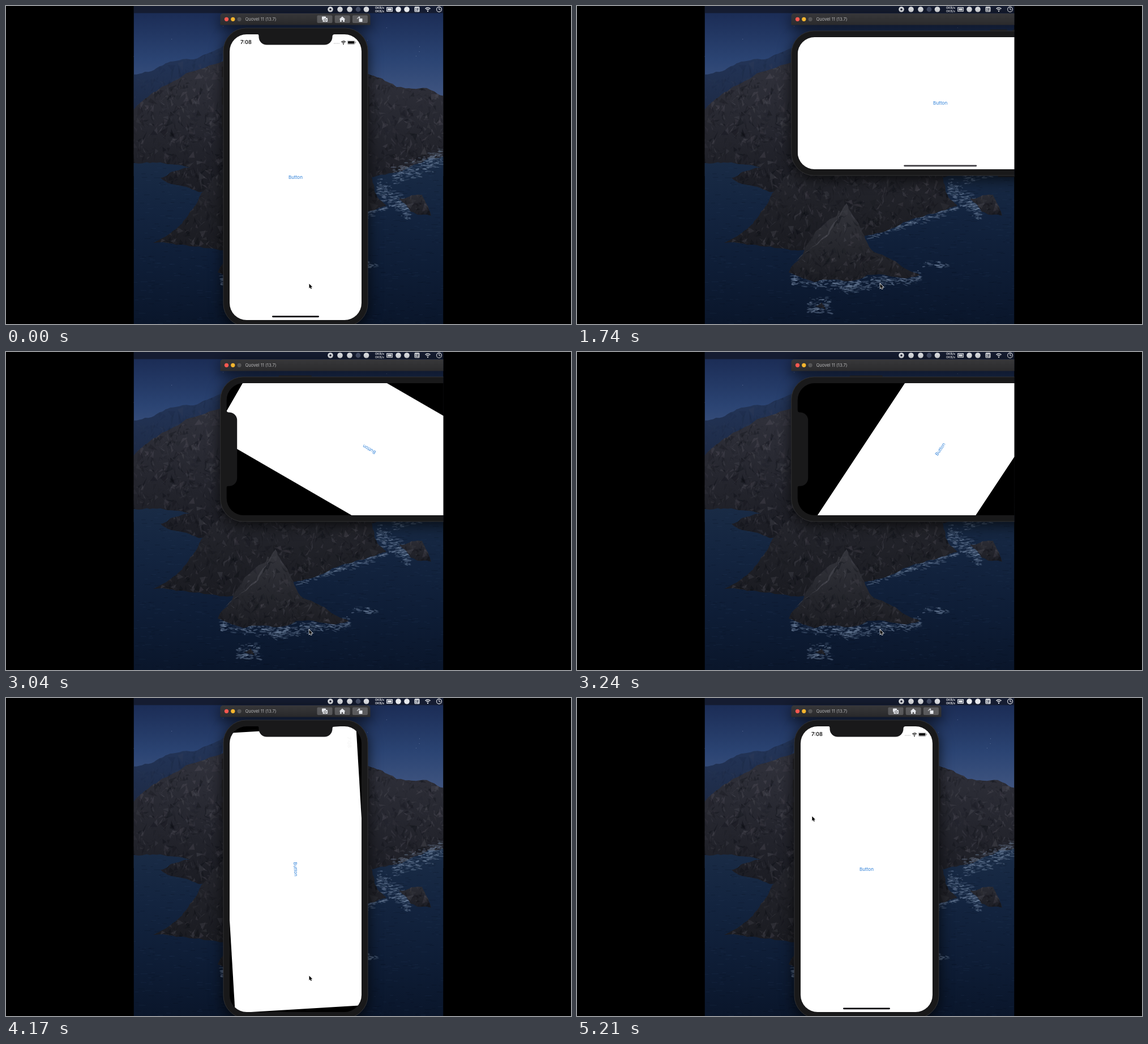
An HTML page with a canvas for the animation above (5250 ms loop, 998 by 561 pixels).

```html
<!DOCTYPE html>
<html lang="en">
<head>
<meta charset="utf-8">
<title>Rotating phone simulator</title>
<style>
  html, body { margin: 0; width: 100%; height: 100%; overflow: hidden; background: #000; }
  canvas { display: block; width: 998px; height: 561px; }
</style>
</head>
<body>
<canvas id="stage" width="998" height="561"></canvas>
<script>
const LOOP = 5250, WIDTH = 998, HEIGHT = 561;
const LEFT = 225.5, RIGHT = 772.5;
const LONG = 504, SHORT = 233, BEZEL = 11;
const FONT = 'Inter, Roboto, sans-serif';
const LIGHT = '#e8eaee', NAVY = '#151c31', INK = '#111', BODY = '#19191a';
const stage = document.getElementById('stage').getContext('2d');
const backdrop = new OffscreenCanvas(WIDTH, HEIGHT);
let c = backdrop.getContext('2d');

// turn: quarter turns of the phone; angle and portrait: [from, to] of its content
const scenes = [
  { at: 0, turn: 0, angle: [0, 0], portrait: [1, 1] },
  { at: 800, turn: 1, angle: [90, 0], portrait: [1, 0], start: 1100, end: 1440 },
  { at: 1900, turn: 2, angle: [90, 90], portrait: [0, 0] },
  { at: 2900, turn: 3, angle: [-180, 0], portrait: [0, 0], start: 2900, end: 3444 },
  { at: 3940, turn: 0, angle: [90, 0], portrait: [0, 1], start: 4130, end: 4480 },
];

const ramp = (t, a, b) => Math.min(1, Math.max(0, (t - a) / (b - a)));
const ease = u => u * u * (3 - 2 * u);
const mix = ([a, b], u) => a + (b - a) * u;

let seed = 7;
function random() {
  seed = (seed * 16807) % 2147483647;
  return seed / 2147483647;
}
const spread = size => (random() + random() - 1) * size;

function rect(x, y, w, h, color, r = 0) {
  c.fillStyle = color;
  c.beginPath();
  c.roundRect(x, y, w, h, r);
  c.fill();
}
function disc(x, y, r, color) {
  c.fillStyle = color;
  c.beginPath();
  c.arc(x, y, r, 0, 7);
  c.fill();
}
function ring(x, y, r, color, width = 1, from = 0, to = 7) {
  c.strokeStyle = color;
  c.lineWidth = width;
  c.beginPath();
  c.arc(x, y, r, from, to);
  c.stroke();
}
function shape(path, color) {
  c.fillStyle = color;
  c.fill(new Path2D(path));
}
function text(str, x, y, font, color, align = 'center') {
  c.font = `${font} ${FONT}`;
  c.fillStyle = color;
  c.textAlign = align;
  c.textBaseline = 'middle';
  c.fillText(str, x, y);
}
function fade(y0, y1, ...colors) {
  const g = c.createLinearGradient(0, y0, 0, y1);
  colors.forEach((color, i) => g.addColorStop(i / (colors.length - 1), color));
  return g;
}
function withShadow(draw) {
  c.save();
  c.shadowColor = 'rgba(0,0,0,.75)';
  c.shadowBlur = 24;
  c.shadowOffsetY = 6;
  draw();
  c.restore();
}
function wifi(x, y, color, size) {
  disc(x, y, size * .2, color);
  for (const r of [.55, 1]) ring(x, y, size * r, color, size * .25, -2.4, -.74);
}

// Splits every edge in half repeatedly, shifting the middles at random
function roughen(points, levels = 4) {
  if (!levels) return points;
  return roughen(points.flatMap((a, i) => {
    const b = points[(i + 1) % points.length];
    const shift = Math.hypot(b[0] - a[0], b[1] - a[1]) * .12;
    return [a, [(a[0] + b[0]) / 2 + spread(shift), (a[1] + b[1]) / 2 + spread(shift)]];
  }), levels - 1);
}

function rock(corners, top, bottom, grain = .3) {
  const xs = corners.map(p => p[0]), ys = corners.map(p => p[1]);
  const x = Math.min(...xs), y = Math.min(...ys);
  const w = Math.max(...xs) - x, h = Math.max(...ys) - y;
  c.save();
  c.beginPath();
  for (const p of roughen(corners)) c.lineTo(...p);
  c.fillStyle = fade(y, y + h, top, bottom);
  c.fill();
  c.clip();
  for (let i = 0; i < w * h / 45; i++) {
    const px = x + random() * w, py = y + random() * h;
    const shade = random() < .5 ? '96,94,104' : '5,7,13';
    c.fillStyle = `rgba(${shade},${random() * grain})`;
    c.beginPath();
    for (let k = 0; k < 3; k++) c.lineTo(px + spread(10), py + spread(13));
    c.fill();
  }
  c.restore();
}

function foam([x0, y0], [x1, y1], height) {
  for (let i = 0; i < Math.hypot(x1 - x0, y1 - y0) * height / 7; i++) {
    const u = random();
    c.fillStyle = `rgba(122,142,170,${random() * .5})`;
    c.beginPath();
    c.ellipse(x0 + (x1 - x0) * u, y0 + (y1 - y0) * u + spread(height),
      1 + random() * 5, .4 + random(), spread(.5), 0, 7);
    c.fill();
  }
}

function wallpaper() {
  rect(LEFT, 0, RIGHT - LEFT, 300, fade(10, 180, '#1b2c55', '#2b4473', '#465a84'));
  for (let i = 0; i < 16; i++)
    disc(LEFT + random() * 547, 20 + random() * 75, .5, 'rgba(150,165,200,.7)');
  rect(LEFT, 262, RIGHT - LEFT, 299, fade(262, HEIGHT, '#1a2c46', '#13243f', '#0e1d36', '#0a162b'));
  for (let i = 0; i < 900; i++)
    rect(LEFT + random() * 547, 285 + random() * 276, 3 + random() * 9, .8,
      random() < .5 ? 'rgba(52,78,112,.2)' : 'rgba(3,9,22,.25)');

  rock([[220, 122], [290, 98], [384, 70], [384, 190], [220, 190]], '#24365a', '#1d2a45', .08);
  rock([[220, 190], [265, 151], [384, 97], [640, 120], [690, 143], [780, 162], [780, 263],
    [640, 302], [345, 328], [273, 303], [325, 284], [220, 278]], '#31323c', '#1b1c23');
  foam([684, 300], [772, 268], 20);
  foam([655, 318], [715, 362], 22);
  foam([515, 406], [672, 356], 9);
  rock([[384, 285], [345, 330], [311, 384], [260, 418], [378, 431], [515, 404],
    [610, 372], [672, 352], [644, 295]], '#25262d', '#1a1b21');
  foam([380, 480], [500, 494], 17);
  foam([470, 495], [608, 477], 13);
  foam([408, 530], [450, 528], 18);
  foam([612, 454], [656, 458], 7);
  rock([[476, 348], [374, 470], [420, 487], [550, 476], [606, 475], [520, 430]], '#34353c', '#1b1c22');
  rock([[476, 349], [384, 452], [446, 402]], '#45464e', '#36373e');
  rock([[694, 340], [735, 333], [751, 370], [715, 363]], '#2b2c34', '#1c1d24');
  rock([[420, 530], [432, 523], [439, 535]], '#24252c', '#15161c');
}

function menuBar() {
  rect(LEFT, 0, RIGHT - LEFT, 12.5, NAVY);
  for (const x of [573, 590, 607, 636.5, 693, 708]) disc(x, 6, 4.8, LIGHT);
  disc(573, 6, 1.8, NAVY);
  disc(622, 6, 4.4, '#48516a');
  for (const y of [3.2, 8.9]) text('0KB/s', 660, y, '600 5.4px', LIGHT);
  rect(672, 2, 11, 8, LIGHT, 1);
  ['#343b50', LIGHT].forEach((color, i) => rect(673.2 + i, 3.2 + i, 8.6 - 2 * i, 5.6 - 2 * i, color));
  rect(721.5, 1.2, 9, 9.4, LIGHT, 1.5);
  c.font = '7px "Noto Sans CJK SC", "Noto Sans CJK", sans-serif';
  c.fillStyle = NAVY;
  c.fillText('拼', 726, 6);
  wifi(745, 9, LIGHT, 6);
  ring(765, 6, 4.4, LIGHT, 1.1);
  c.stroke(new Path2D('M765 3V6L767.4 7'));
}

function titleBar(landscape) {
  withShadow(() => rect(378.5, 13, landscape ? 534 : 265, 20.5, fade(13, 33, '#373739', '#2d2d2f'), [5, 5, 0, 0]));
  ['#fe5850', '#f7b72f', '#565657'].forEach((color, i) => disc(389.5 + i * 11.3, 23.3, 3.6, color));
  text('Quovel 11 (13.7)', 422.5, 23.7, '7.6px', '#b8b8b9', 'left');
  if (landscape) return;
  const key = '#5c5c5e';
  for (let i = 0; i < 3; i++) rect(549.5 + i * 31.2, 16.5, 27, 13.5, key, 2);
  rect(558, 18.5, 7, 6, LIGHT, 1);
  rect(559.5, 21, 8.5, 7, LIGHT, 1);
  ring(563.8, 24.6, 2, key);
  shape('M588.5 23.5 594 18.5 599.5 23.5H598V28H595.2V25H592.8V28H590V23.5Z', LIGHT);
  rect(623.5, 22, 6, 6, LIGHT, .5);
  ring(623.5, 23, 3, LIGHT, 1, 3.14, 4.71);
  shape('M623 18 626 20 623 22Z', LIGHT);
}

function statusBar(w, h) {
  const x = w / 2, y = -h / 2 + 14, grey = '#8b8b8d';
  text('7:08', -x + 29, y, '600 9.2px', INK);
  for (let i = 0; i < 4; i++) disc(x - 48 + i * 2.7, y + 2, .8, '#b5b5b7');
  wifi(x - 32, y + 3, INK, 5);
  rect(x - 25.3, y - 3.3, 14, 7, grey, 2);
  rect(x - 24.7, y - 2.7, 12.8, 5.8, '#fff', 1.5);
  rect(x - 24, y - 2, 11.4, 4.4, INK, 1);
  rect(x - 10.8, y - 1, 1, 2.4, grey, .5);
}

function content({ angle, portrait, barAlpha }) {
  const w = mix([LONG, SHORT], portrait), h = mix([SHORT, LONG], portrait);
  const bar = portrait > .5 ? 83 : 129;
  c.save();
  c.rotate(angle * Math.PI / 180);
  rect(-w / 2, -h / 2, w, h, '#fff');
  text('Button', 0, .3, '8.2px', '#2f80d8');
  c.globalAlpha = portrait;
  statusBar(w, h);
  c.globalAlpha = barAlpha;
  rect(-bar / 2, h / 2 - 7.5, bar, 2.7, '#08060c', 1.35);
  c.restore();
}

function phone(scene, pose) {
  const landscape = scene.turn % 2;
  const w = SHORT + BEZEL * 2, h = LONG + BEZEL * 2;
  const turn = () => c.rotate(scene.turn * Math.PI / 2);
  c.save();
  c.translate(landscape ? 641.7 : 511.5, landscape ? 171.5 : 302);

  c.save();
  turn();
  for (const [side, y, length] of [[-1, -195, 19], [-1, -158, 30], [-1, -118, 30], [1, -160, 58]])
    rect(side * 128.5 - 1.5, y, 3, length, '#242426', 1);
  withShadow(() => rect(-w / 2, -h / 2, w, h, BODY, 40));
  c.strokeStyle = '#303032';
  c.lineWidth = 1;
  c.stroke();
  c.beginPath();
  c.roundRect(-SHORT / 2, -LONG / 2, SHORT, LONG, 30);
  c.restore();

  c.save();
  c.clip();
  c.fillStyle = '#000';
  c.fillRect(-LONG, -LONG, LONG * 2, LONG * 2);
  content(pose);
  c.restore();

  turn();
  const top = -LONG / 2, half = 65, lip = 4, depth = 18.5, r = 14;
  c.fillStyle = BODY;
  c.beginPath();
  c.moveTo(-half - lip, top - 1);
  c.arcTo(-half, top, -half, top + lip, lip);
  c.arcTo(-half, top + depth, 0, top + depth, r);
  c.arcTo(half, top + depth, half, top + lip, r);
  c.arcTo(half, top, half + lip, top, lip);
  c.lineTo(half + lip, top - 1);
  c.fill();
  c.restore();
}

function pointer(t) {
  const u = ease(ramp(t, 4650, 5200));
  const arrow = new Path2D('M0 0V8L1.8 6.3 3 9.2 4.4 8.6 3.2 5.8H5.7Z');
  c.save();
  c.translate(mix([535.5, 415.3], u), mix([490, 208.7], u));
  c.strokeStyle = '#fff';
  c.lineWidth = 1.4;
  c.stroke(arrow);
  c.fillStyle = '#000';
  c.fill(arrow);
  c.restore();
}

function poseAt({ angle, portrait, start, end }, t) {
  const u = start ? ease(ramp(t, start, end)) : 0;
  return {
    angle: mix(angle, u),
    portrait: mix(portrait, u),
    barAlpha: !start || t < start ? 1 : ramp(t, end + 50, end + 370),
  };
}

function draw(now) {
  let t = now % LOOP;
  if (t > 4370 && t < 4440) t = 4370; // brief stall in the last turn
  const scene = scenes.findLast(s => t >= s.at);
  c.clearRect(0, 0, WIDTH, HEIGHT);
  c.save();
  c.beginPath();
  c.rect(LEFT, 0, RIGHT - LEFT, HEIGHT);
  c.clip();
  c.drawImage(backdrop, 0, 0);
  titleBar(scene.turn % 2);
  phone(scene, poseAt(scene, t));
  pointer(t);
  c.restore();
  requestAnimationFrame(draw);
}

wallpaper();
menuBar();
c = stage;
requestAnimationFrame(draw);
</script>
</body>
</html>
```
